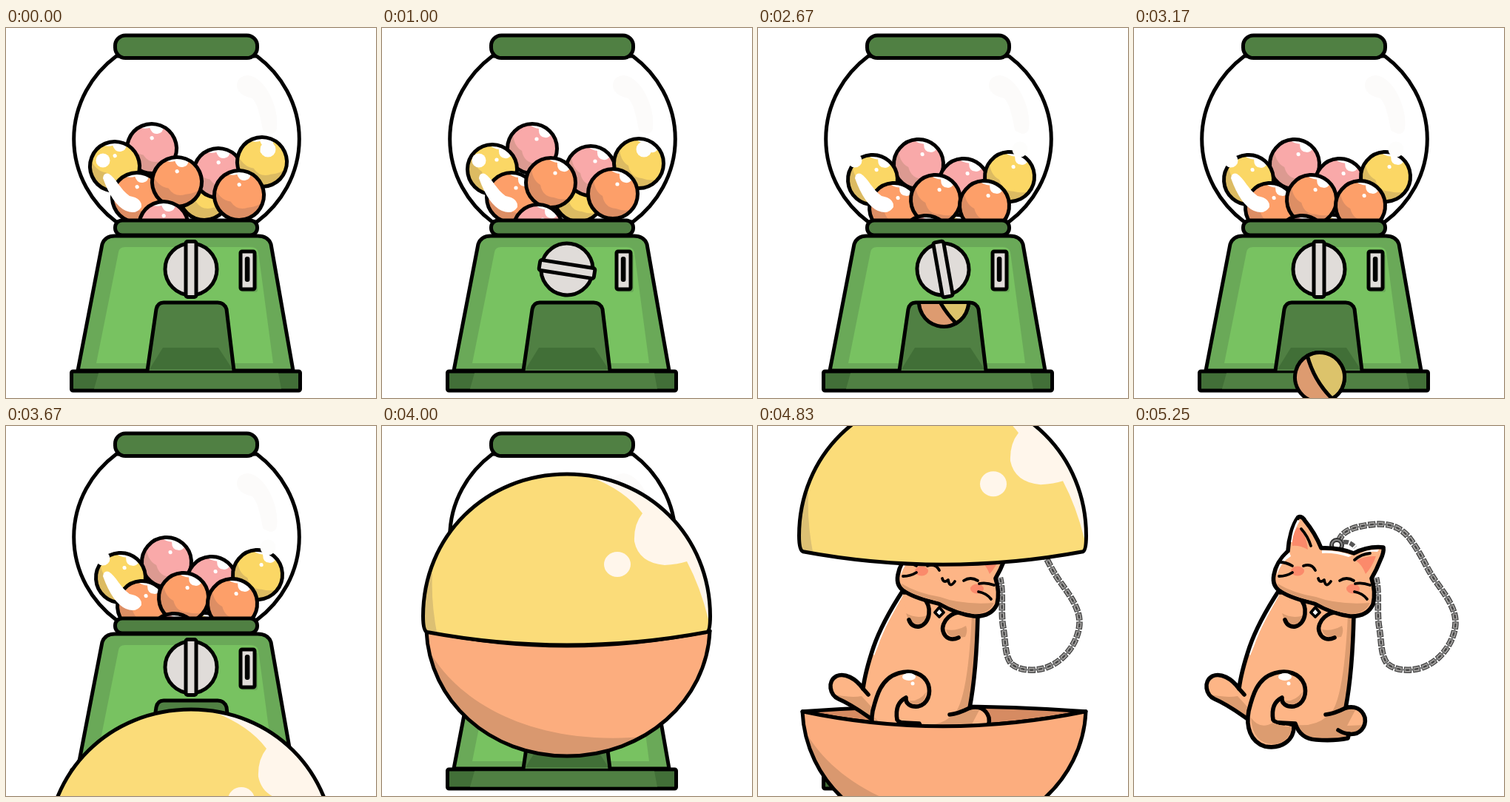
These frames come from a looping animation (500 by 500 pixels, 7 s). An HTML page:

```html
<!DOCTYPE html>
<html lang="en">
<head>
<meta charset="utf-8">
<title>Gumball machine</title>
<style>
  html, body { margin: 0; width: 100%; height: 100%; overflow: hidden; background: #fff; }
  svg { display: block; width: 100vw; height: 100vh; }
  .ink { stroke: #000; stroke-width: 5; stroke-linejoin: round; stroke-linecap: round; }
  .line { fill: none; }
  .fur { fill: #fdb586; }
  .furShade { fill: #dc9c70; }
  .white { fill: #fff; }
  #cat .ink { stroke-width: 5.6; }
  #cat .fine { stroke-width: 3.8; }
</style>
</head>
<body>
<svg viewBox="0 0 500 500">
  <defs>
    <clipPath id="ballClip"><circle r="33.5"/></clipPath>
    <clipPath id="chuteClip"><rect y="373" width="500" height="127"/></clipPath>
    <path id="domeShape" d="M61 229.500Q55.500 228 55.500 208C55.500 100 140 16 250 16S443.500 100 443.500 208Q443.500 228 439 229.500Q345 247 250 247T61 229.500Z"/>
    <clipPath id="domeClip"><use href="#domeShape"/></clipPath>
    <path id="bowlShape" d="M60 326Q155 346 250 346T443 326C439 420 355 495 250 495S64 420 60 326Z"/>
    <clipPath id="bowlClip"><use href="#bowlShape"/></clipPath>
    <path id="bodyShape" d="M130 292Q134 281 147 281H340Q354 281 358 292L388 463H97Z"/>
    <clipPath id="bodyClip"><use href="#bodyShape"/></clipPath>
    <path id="chain" d="M277 156C280 142 296 137 315 134C345 129 362 137 374 154C392 179 395 193 410 213C426 235 437 252 434 272C430 298 410 320 388 327C370 332 352 330 342 321C333 309 335 292 331 270C328 248 332 226 327 205"/>
    <path id="catBody" d="M196 222C179 248 165 273 156 299C149 320 144 338 142 355C132 341 117 333 106 338C93 345 97 364 109 369C128 377 143 389 158 399L218 402C222 415 230 423 246 424Q270 426 289 422Q291 417 288 416C306 419 314 406 312 394C308 381 297 378 286 381C292 350 296 300 297 255Z"/>
    <clipPath id="catClip"><use href="#catBody"/></clipPath>
  </defs>

  <g id="machine">
    <path class="ink white" d="M149 38A151.500 143 0 0 0 149 262H339A151.500 143 0 0 0 339 38Z"/>
    <g id="balls"></g>
    <g class="white">
      <circle cx="131" cy="179" r="9.5"/>
      <path d="M131 203Q132 195 139 197C148 202 155 219 167 227Q184 230 183 242Q176 253 162 247Q144 239 131 203Z"/>
      <circle cx="354" cy="164" r="10.5" fill="#fdfdfc"/>
      <path fill="#fcfbfa" d="M312 80Q311 65 327 64C350 66 370 108 366 136Q362 149 347 138C344 122 341 104 333 95Q316 92 312 80Z"/>
    </g>
    <g class="ink" fill="#508043">
      <rect x="147.500" y="10" width="192" height="30.500" rx="14"/>
      <rect x="147.500" y="260" width="192" height="20" rx="9.500"/>
    </g>
    <g clip-path="url(#bodyClip)">
      <rect x="90" y="278" width="305" height="190" fill="#6aa958"/>
      <path fill="#78c261" d="M152 303Q153 296 161 296H331Q339 296 341 303L361 453H122Z"/>
    </g>
    <use href="#bodyShape" class="ink line"/>
    <rect x="88.500" y="464" width="309" height="26" rx="2" class="ink" fill="#426f38"/>
    <path d="M125 466.500H368L372 487.500H119Z" fill="#508043"/>
    <path d="M191 463L203 380Q205 371 213 371H286Q295 371 298 380L308 463Z" fill="#508043"/>
    <path d="M194 461L212 432H287L306 461Z" fill="#416f37"/>
    <path class="ink line" d="M191 463L203 380Q205 371 213 371H286Q295 371 298 380L308 463"/>
    <rect x="318" y="306" width="22" height="51" rx="3" fill="#6aa958"/>
    <rect x="317" y="302" width="19" height="51" rx="2" class="ink" fill="#e0dcd9"/>
    <rect x="322.800" y="309" width="6.600" height="34" rx="3"/>
    <g id="knob" class="ink" fill="#e0dcd9">
      <circle r="35"/>
      <rect x="-7" y="-37.500" width="14" height="75" rx="2.500"/>
    </g>
    <g clip-path="url(#chuteClip)">
      <g id="drop" class="ink">
        <circle r="33.500" fill="#dd9b70"/>
        <path d="M-33.500 0A33.500 33.500 0 0 1 33.500 0Q0 9 -33.500 0Z" fill="#dcc36b"/>
      </g>
    </g>
  </g>

  <circle id="clearing" class="white" cx="250" cy="256" r="195"/>

  <path id="bowlBack" class="ink" fill="#d68b62" d="M60 326Q155 319 250 319T443 326Q345 346 250 346T60 326Z"/>

  <g id="cat">
    <g fill="none">
      <use href="#chain" stroke="#3f3f3f" stroke-width="8.500" stroke-dasharray="10 2"/>
      <use href="#chain" stroke="#a5a3a1" stroke-width="6" stroke-dasharray="8 4" stroke-dashoffset="-1"/>
      <use href="#chain" stroke="#444" stroke-width="2.400" stroke-dasharray="5 7" stroke-dashoffset="-2.500"/>
      <use href="#chain" stroke="#777" stroke-width="2.400" stroke-dasharray="6 6" stroke-dashoffset="-8"/>
      <path d="M283 157Q291 155 299 164" stroke="#555" stroke-width="6" stroke-dasharray="7 2"/>
      <circle cx="274" cy="161" r="7" stroke="#333" stroke-width="6"/>
      <circle cx="274" cy="161" r="7" stroke="#888" stroke-width="2"/>
    </g>
    <use href="#catBody" class="fur"/>
    <g clip-path="url(#catClip)">
      <path class="furShade" d="M95 361Q122 368 140 365L160 387V402ZM221 404Q245 406 260 393Q283 384 289 255H300V382L288 405L316 404V430H221Z"/>
      <path class="white" d="M200 222C184 250 170 274 162 298L157 310L152 306L190 222Z"/>
    </g>
    <use href="#catBody" class="ink line"/>
    <path class="ink line" d="M142 355L149 363M259 390Q270 389 286 381M276 411Q284 416 291 416"/>

    <path class="ink fur" d="M188 397C186 385 188 373 200 367C199 375 206 380 216 379C230 376 234 361 230 349C224 334 207 329 190 334C166 341 160 365 155 385C151 406 157 427 177 433C199 437 217 425 216 404Q205 401 203 402Q190 401 188 397Z"/>
    <path class="furShade" d="M158 394Q170 411 188 401Q201 407 213 406Q212 424 193 430Q160 432 158 394ZM204 371Q217 373 227 360Q226 375 214 376Q205 376 204 371Z"/>
    <ellipse class="white" cx="204" cy="339" rx="9" ry="5"/>
    <circle class="white" cx="209" cy="348" r="2.500"/>

    <path class="fur" d="M195 226C220 220 233 238 231 254C229 270 214 279 203 262ZM286 253C261 246 247 266 250 277C253 288 262 290 271 286L287 265Z"/>
    <path class="furShade" d="M200 253Q214 261 229 256Q226 271 213 270Q205 269 203 261ZM254 275Q267 278 281 270Q284 277 280 285L271 286Q257 286 254 275Z"/>
    <path class="ink line" d="M197 225C220 221 233 238 231 254C229 273 209 277 204 262M285 253C261 246 247 266 250 277C253 288 262 290 271 286"/>

    <path class="ink fur" d="M208 169C209 152 214 134 222 123Q227 121 231 128Q245 145 253 165Q276 164 297 172Q316 162 337 164Q338 171 333 181Q328 194 321 206Q327 224 323 241Q315 258 292 257Q269 254 244 240Q213 233 199 224Q186 217 189 201Q192 184 208 169Z"/>
    <path class="furShade" d="M194 213Q215 226 246 231Q275 242 319 239Q312 254 292 254Q268 251 246 238Q213 229 201 222Q195 219 194 213Z"/>
    <path class="white" d="M210 171Q194 184 193 202Q198 184 212 176ZM212 157Q214 139 221 127L224 128Q217 139 214 157ZM254 168Q278 168 294 175L290 177Q272 171 254 172ZM304 173Q317 166 331 167L329 170Q315 169 304 173Z"/>
    <path fill="#fb8a6b" d="M220 137Q213 149 214 162Q224 161 235 167Q233 148 224 138ZM300 182Q312 175 327 176Q322 190 313 200Q308 187 300 182Z"/>
    <ellipse fill="#fb8a6b" cx="221" cy="196" rx="9" ry="6.500"/>
    <ellipse fill="#fb8a6b" cx="296" cy="220" rx="9" ry="6.500"/>
    <g class="ink line fine">
      <path d="M226 139Q235 149 239 162M298 181Q307 173 319 172"/>
      <path d="M229 189Q240 185 245 195M278 209Q287 203 297 209M249 206Q251 213 257 208Q259 220 266 210"/>
      <path d="M196 184Q206 184 214 189M196 203Q206 203 214 198M299 213Q308 211 319 215M298 224Q309 226 315 234"/>
    </g>
    <path class="ink white fine" d="M245 245L251 252L245 258L239 252Z"/>
  </g>

  <g id="bowl">
    <use href="#bowlShape" fill="#fcad7e"/>
    <path clip-path="url(#bowlClip)" fill="#d9986f" d="M54 332C84 410 190 486 362 468L330 500H50Z"/>
    <use href="#bowlShape" class="ink line"/>
  </g>
  <g id="dome">
    <use href="#domeShape" fill="#fbdc79"/>
    <g clip-path="url(#domeClip)">
      <path fill="#dcc073" d="M50 150H68Q66 190 75 235H50Z"/>
      <g fill="#fff6eb">
        <path d="M280 19Q329 38 352 69Q340 84 341 107Q347 136 382 139Q400 138 412 134Q430 168 441 212L460 200V10Z"/>
        <ellipse cx="318" cy="138" rx="18" ry="17"/>
      </g>
    </g>
    <use href="#domeShape" class="ink line"/>
  </g>
</svg>

<script>
const LOOP = 7000, FPS = 12;
const el = id => document.getElementById(id);

// Ticks at which knob, spin and ball positions are known.
const KEYS = [5, 12, 23, 32, 33];
const KNOB = [0, 99, 230, 350, 360];
const SPIN = [-24, 0, 4, -4, -4];

const TONES = {
  yellow: ['#fbd765', '#dcbb62'],
  pink: ['#f9a9a9', '#dc9a91'],
  orange: ['#fd9f69', '#dd8e64']
};
// Back to front: tone, then x,y at the first four keys.
const BALLS = [
  ['pink', 197, 163, 203, 163, 212, 178, 217, 184],
  ['yellow', 147, 187, 149, 191, 146, 198, 155, 205],
  ['orange', 177, 229, 175, 229, 180, 234, 184, 243],
  ['yellow', 268, 226, 266, 228, 267, 267, 268, 286],
  ['pink', 287, 196, 282, 193, 281, 197, 278, 210],
  ['yellow', 346, 181, 347, 183, 344, 191, 340, 201],
  ['orange', 231, 208, 228, 209, 233, 221, 240, 232],
  ['orange', 315, 226, 312, 224, 308, 231, 306, 240],
  ['pink', 213, 268, 211, 272, 215, 278, 227, 287]
];

el('balls').innerHTML = BALLS.map(([tone]) => {
  const [fill, shade] = TONES[tone];
  return `<g><g clip-path="url(#ballClip)">
    <circle r="34" fill="${shade}"/>
    <path fill="${fill}" d="M-26 -26Q-27 -5 -14 3Q-11 19 4 20Q18 25 29 20L40 0L20 -40Z"/>
    <path class="white" d="M-8 -36Q2 -27 9 -27Q8 -16 17 -15Q23 -14 26 -20Q30 -17 31 -8L40 -10L25 -40Z"/>
    <circle class="white" cx="6" cy="-13" r="2.600"/>
  </g><circle r="33.5" class="ink line"/></g>`;
}).join('');
const ballNodes = [...el('balls').children];

function tween(values, tick) {
  const last = values.length - 1;
  if (tick <= KEYS[0]) return values[0];
  for (let i = 0; i < last; i++) {
    if (tick <= KEYS[i + 1]) {
      const p = (tick - KEYS[i]) / (KEYS[i + 1] - KEYS[i]);
      return values[i] + (values[i + 1] - values[i]) * p;
    }
  }
  return values[last];
}

const show = (id, on) => el(id).style.display = on ? '' : 'none';
const place = (node, x, y, turn = 0) =>
  node.setAttribute('transform', `translate(${x} ${y}) rotate(${turn})`);

function draw(tick) {
  const opening = tick >= 53;
  const capsule = tick >= 44 && tick < 63;

  show('machine', tick < 63);
  show('clearing', opening);
  show('cat', opening);
  show('drop', tick >= 29 && tick < 42);
  for (const id of ['bowlBack', 'bowl', 'dome']) show(id, capsule);

  place(el('knob'), 250, 326, tween(KNOB, tick));
  const spin = tween(SPIN, tick);
  BALLS.forEach(([, ...p], i) => {
    const x = tween(p.filter((_, j) => j % 2 === 0), tick);
    const y = tween(p.filter((_, j) => j % 2 === 1), tick);
    place(ballNodes[i], x, y, spin);
  });
  place(el('drop'), 251, 370 + 17 * (tick - 32), 60);

  // The capsule rises, rests, then its halves part.
  const rise = 79.5 * Math.max(0, 48 - tick);
  const gap = opening ? 49 * ((tick - 52) / 3) ** 1.15 : 0;
  place(el('dome'), 0, 49 + rise - gap);
  place(el('bowl'), 0, rise + gap - 49);
  place(el('bowlBack'), 0, rise + gap - 49);
}

let shown = -1;
function frame() {
  const t = performance.now() % LOOP;
  const tick = Math.floor((t + 5) * FPS / 1000) % (LOOP * FPS / 1000);
  if (tick !== shown) draw(shown = tick);
  requestAnimationFrame(frame);
}
frame();
</script>
</body>
</html>
```
